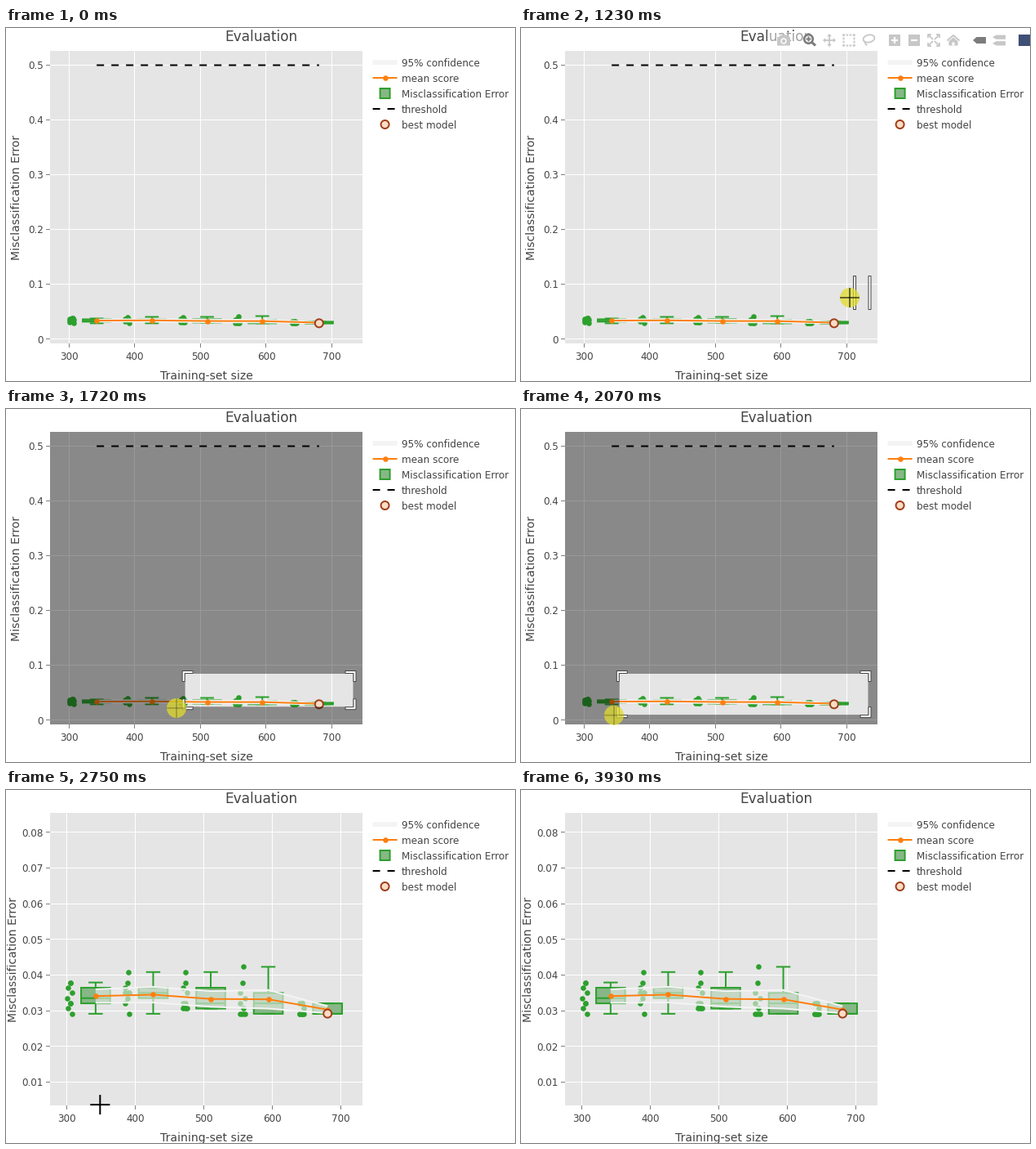
These frames come from a looping animation (624 by 432 pixels, 4000 ms). A matplotlib script:

```python
import numpy as np
import matplotlib.pyplot as plt
from matplotlib.animation import FuncAnimation
from matplotlib.patches import Circle, Ellipse, PathPatch, Polygon, Rectangle
from matplotlib.path import Path

W, H, DPI = 624, 432, 96
PX = 72 / DPI                       # points per pixel
FRAMES, STEP = 200, 20
L, T, R, B = 54, 28, 437, 386       # plot area
START = (425.5, 324)                # where the drag begins

TEXT, GREEN, ORANGE = "#444444", "#2ca02c", "#ff7f0e"
PEACH, RUST, BOX = "#fbdcc6", "#a0401c", "#87b787"
ICON, ACTIVE = "#c7c7c7", "#7c7c7c"

plt.rcParams["font.family"] = "DejaVu Sans"
fig = plt.figure(figsize=(W / DPI, H / DPI), dpi=DPI, facecolor="white")
ax = fig.add_axes([0, 0, 1, 1])
ax.set_xlim(0, W)
ax.set_ylim(H, 0)
ax.axis("off")
area = Rectangle((L, T), R - L, B - T, fc="#e5e5e5", ec="none", zorder=0)
ax.add_patch(area)


def line(xs, ys, color, width=2, z=3, **kw):
    return ax.plot(xs, ys, color=color, lw=width * PX, zorder=z, snap=False,
                   solid_capstyle="butt", dash_capstyle="butt", **kw)[0]


def dashed(xs, ys):
    return line(xs, ys, "black", z=2.9, dashes=(4.5, 4.5))


def dots(xs, ys, color, size=6.6, z=3):
    return ax.plot(xs, ys, "o", color=color, ms=size * PX, mec="none",
                   zorder=z, snap=False)[0]


def best(x, y):
    return patch(Circle((x, y), 5, fc=PEACH, ec=RUST, lw=2 * PX), 3)


def label(x, y, s, size=12, ha="left", **kw):
    return ax.text(x, y, s, fontsize=size * PX, color=TEXT, ha=ha,
                   va="baseline", zorder=6, **kw)


def patch(p, z):
    p.set_zorder(z)
    p.set_snap(False)
    return ax.add_patch(p)


def polys(*shapes):
    verts, codes = [], []
    for s in shapes:
        verts += list(s) + [s[0]]
        codes += [Path.MOVETO] + [Path.LINETO] * (len(s) - 1) + [Path.CLOSEPOLY]
    return Path(verts, codes)


def rect(l, t, r, b):
    return [(l, t), (r, t), (r, b), (l, b)]


def crisp(v):
    """Middle of the pixel row or column a hairline falls in."""
    return np.floor(v - .3) + .5


# ---- data -----------------------------------------------------------------
UNIT = 684                          # errors are whole counts out of this
SIZES = np.array([342, 426, 510, 594, 680.5])
MEAN = np.array([.0342, .0346, .0334, .0333, .0304])
SPREAD = np.array([.0019, .0022, .0022, .0026, .0010])
# lowest, first quartile, median, third quartile, highest
BOXES = [(20, 22, 23, 25, 26), (20, 23, 24, 25, 28), (21, 21, 22, 25, 28),
         (20, 20, 22, 24, 29), (20, 20, 20, 22, 22)]
RANK = np.arange(9)
JITTER = -38 + 3.5 * np.cos(2.5 * RANK)


def view(x300, sx, y0, sy, yticks, fmt, title_x):
    """Draw the chart for one axis range and return its artists."""
    X = lambda v: x300 + (np.asarray(v) - 300) * sx
    Y = lambda v: y0 - np.asarray(v) * sy
    N = lambda n: Y(np.asarray(n) / UNIT)
    out, marks = [], []

    for v in range(300, 701, 100):
        x = crisp(X(v))
        out += [line([x, x], [T, B], "white", 1, 1),
                line([x, x], [B, B + 5], "#7f7f7f", 1, 1),
                label(X(v), 406, str(v), ha="center")]
    for v in yticks:
        y = crisp(Y(v))
        out += [line([L, R], [y, y], "white", 1, 1),
                line([L - 5, L], [y, y], "#7f7f7f", 1, 1),
                label(46, Y(v) + 4.5, fmt % v, ha="right")]
    out.append(label(title_x, 207, "Misclassification Error", 14, "center",
                     rotation=90, rotation_mode="anchor"))

    for c, summary in zip(SIZES, BOXES):
        l, m, r = X([c - 21.2, c, c + 21.2])
        cap = X([c - 10.4, c + 10.4])
        lo, q1, med, q3, hi = N(summary)
        marks.append(patch(Rectangle((l, q3), r - l, q1 - q3, fc=BOX,
                                     ec=GREEN, lw=2 * PX), 2))
        marks.append(line([l, r], [med, med], GREEN, z=2.1))
        for a, b in ((q3, hi), (q1, lo)):
            marks.append(line([m, m], [a, b], GREEN, z=2.1))
            marks.append(line(cap, [b, b], GREEN, z=2.1))
        counts = np.round(np.interp(RANK, RANK[::2], summary))
        marks.append(dots(X(c + JITTER), N(counts), GREEN, z=2.2))

    xs, mid = X(SIZES), Y(MEAN)
    up, low = Y(MEAN + SPREAD), Y(MEAN - SPREAD)
    ring = list(zip(xs, up)) + list(zip(xs[::-1], low[::-1]))
    marks.append(patch(Polygon(ring, fc="#ededed", ec="none", alpha=.6), 2.5))
    for edge in (up, low):
        marks.append(line(xs, edge, "#f4f4f4", z=2.6))
    marks += [line(xs, mid, ORANGE, z=2.8), dots(xs, mid, ORANGE, z=2.8),
              dashed(xs[[0, -1]], Y([.5, .5])), best(xs[-1], Y(.0293))]
    for a in marks:
        a.set_clip_path(area)
    return out + marks


wide = view(77.35, .8055, 381, 671, np.arange(6) / 10, "%g", 17)
close = view(74.6, .84, 401.6, 4368, np.arange(1, 9) / 100, "%.2f", 13.5)

# ---- titles and legend ----------------------------------------------------
label(313, 16, "Evaluation", 17, "center")
label(245.7, 430, "Training-set size", 14, "center")
rows = 42 + 19 * np.arange(5)
for y, s in zip(rows, ("95% confidence", "mean score", "Misclassification Error",
                       "threshold", "best model")):
    label(484.7, y + 4.7, s)
key = np.array([449.6, 479.6])
mid_key = key.mean()
line(key, rows[[0, 0]], "#f4f4f4", 6)
line(key, rows[[1, 1]], ORANGE)
dots([mid_key], [rows[1]], ORANGE)
patch(Rectangle((mid_key - 6, rows[2] - 6), 12, 12, fc=BOX, ec=GREEN, lw=2 * PX), 3)
dashed(key, rows[[3, 3]])
best(mid_key, rows[4])

# ---- toolbar --------------------------------------------------------------
bar = []                            # (artist, full opacity)
SIGNS = (-1, 1)
MID = 15                            # middle height of the icons


def tool(artist, alpha=1):
    bar.append((artist, alpha))


def shape(pts, color=ICON):
    tool(patch(Polygon(pts, fc=color, ec="none"), 7))


def stroke(xs, ys, color=ICON, width=2):
    tool(line(xs, ys, color, width, 7))


def disc(x, y, r, color=ICON):
    tool(patch(Circle((x, y), r, fc=color, ec="none"), 7))


def plus(x, y, r, color, width=2):
    stroke([x - r, x + r], [y, y], color, width)
    stroke([x, x], [y - r, y + r], color, width)


def tag(x, y, h, color):
    shape([(x, y), (x + 4.5, y - h), (x + 16, y - h), (x + 16, y + h),
           (x + 4.5, y + h)], color)


tool(patch(Rectangle((302, 5), 322, 18, fc="white", ec="none"), 6.5), .5)
# camera
shape(rect(314, 11, 330, 21.5))
shape(rect(318, 8.5, 326, 11))
disc(322, 16, 3.7, "white")
disc(322, 16, 2.2)
# magnifier
stroke([356.5, 361], [17.5, 21.5], ACTIVE, 3)
disc(352.5, 13.5, 6.6, ACTIVE)
disc(352.5, 13.5, 4, "white")
plus(352.5, 13.5, 3, ACTIVE)
# pan
plus(378, MID, 6, ICON, 1.8)
for a in np.arange(4) * np.pi / 2:
    ux, uy = np.cos(a), np.sin(a)
    cx, cy = 378 + 4.8 * ux, MID + 4.8 * uy
    shape([(378 + 8 * ux, MID + 8 * uy), (cx + 3 * uy, cy - 3 * ux),
           (cx - 3 * uy, cy + 3 * ux)])
# box select
for k in 4.1 * np.arange(4) - 7.5:
    for s in SIGNS:
        stroke([402 + k, 404.6 + k], [MID + 6.5 * s] * 2)
        stroke([402 + 6.5 * s] * 2, [MID + k, MID + k + 2.6])
# lasso
tool(patch(Ellipse((426.5, 13), 14, 9, angle=-12, fill=False, ec=ICON,
                   lw=1.8 * PX), 7))
stroke([421, 422, 424], [16, 18.5, 21.5], width=1.8)
# zoom in and out
for x in (458, 482):
    shape(rect(x - 7, MID - 7, x + 7, MID + 7))
plus(458, MID, 4, "white", 2.2)
stroke([478, 486], [MID, MID], "white", 2.2)
# autoscale
for ux in SIGNS:
    for uy in SIGNS:
        stroke([506 + ux * d for d in (3, 7, 7)],
               [MID + uy * d for d in (7, 7, 3)], width=1.8)
        stroke([506 + ux, 506 + ux * 6], [MID + uy, MID + uy * 6], width=1.8)
# home
stroke([522.5, 530, 537.5], [15.5, 9, 15.5])
shape([(530, 11.5), (535.5, 16.2), (535.5, 21.5), (524.5, 21.5), (524.5, 16.2)])
shape(rect(528.5, 17.5, 531.5, 21.5), "white")
# hover tags
tag(554, MID, 4, ACTIVE)
for s in SIGNS:
    tag(578, MID + 3.8 * s, 2.6, ICON)
shape(rect(610, 8, 624, 22), "#3f4f75")

# ---- selection and pointer ------------------------------------------------
shade = patch(PathPatch(polys(rect(L, T, R, B)), fc="black", ec="none"), 4)
grips = patch(PathPatch(polys(rect(L, T, R, B)), fc="white", ec=TEXT, lw=PX), 5)
glow = patch(Circle(START, 12, fc="#e1dc2d", ec="none"), 8)
cross = [line([0, 0], [0, 0], "black", 2, 9) for _ in range(2)]
ARROW = np.array([(0, 0), (0, 16), (3.8, 12.6), (6.4, 18.5), (8.8, 17.5),
                  (6.3, 11.6), (11.4, 11.6)])
half = np.array([(-9, 0), (-5, -4), (-5, -1), (5, -1), (5, -4)])
RESIZE = np.vstack([half, -half])
arrow = patch(Polygon(ARROW, fc="white", ec="black", lw=PX), 9)

# time, x, y of the pointer's turning points
PATH = np.array([
    (120, 526, 405), (610, 429, 329), (750, *START), (1160, *START),
    (1370, 358, 342), (1720, 209, 366), (2280, 57, 380), (2680, 57, 380),
    (3310, 582, 426), (3450, 592, 431)]).T


def pointer(t):
    t0, t1 = PATH[0, :2]
    if t0 < t < t1:                 # slows down on the way in
        t = t1 - (t1 - t) ** 2 / (t1 - t0)
    return np.interp(t, PATH[0], PATH[1]), np.interp(t, PATH[0], PATH[2])


def held(t):
    """The picture moves in 70 ms steps counted from a few starts."""
    base = max(b for b in (0, 120, 1230, 2680, 3720) if b <= t)
    return base + (t - base) // 70 * 70 if base else 0


def select(q):
    on = 1230 <= q < 2750
    shade.set_visible(on)
    grips.set_visible(on)
    if not on:
        return
    l, b = pointer(q - 25 if q < 2280 else 2280)
    r, t = START
    b = min(b, 379)
    if b - t < 20:                  # a flat drag selects the full height
        hole = rect(l, T, r, B)
        marks = [rect(l - 3.5, t - 20.5, l - .5, t + 20.5),
                 rect(r + .5, t - 20.5, r + 3.5, t + 20.5)]
    else:
        hole = rect(l, t, r, b)
        bracket = np.array([(-3.5, 9.5), (-.5, 9.5), (-.5, -.5), (9.5, -.5),
                            (9.5, -3.5), (-3.5, -3.5)])
        marks = [bracket * (ux, uy) + (cx, cy)
                 for cx, ux in ((l, 1), (r, -1)) for cy, uy in ((t, 1), (b, -1))]
    shade.set_path(polys(rect(L, T, R, B), hole[::-1]))
    shade.set_alpha(float(np.interp(q, [1270, 1470], [0, .4])))
    grips.set_path(polys(*marks))


def draw(i):
    q = held(i * STEP + STEP // 2)
    zoomed = q >= 2750
    for a in wide:
        a.set_visible(not zoomed)
    for a in close:
        a.set_visible(zoomed)

    fade = float(np.interp(q, [120, 420, 1230, 1480, 2750, 3050, 3620, 3930],
                           [0, 1, 1, 0, 0, 1, 1, 0]))
    for a, full in bar:
        a.set_alpha(full * fade)
        a.set_visible(fade > 0)

    select(q)
    x, y = pointer(q)
    shown = 120 <= q < 3520
    inside = L <= x <= R and T <= y <= B
    on_axis = L <= x <= R and B < y < B + 20
    pressed = 820 <= q < 2680
    glow.center = x, y
    glow.set_visible(pressed)
    glow.set_alpha(.4 if q < 890 else .75)
    cross[0].set_data([x - 12, x + 12], [y, y])
    cross[1].set_data([x, x], [y - 12, y + 12])
    for c in cross:
        c.set_visible(shown and inside)
        c.set_alpha((.55 if q < 1500 else .2) if pressed else 1)
    arrow.set_xy((RESIZE if on_axis else ARROW) + (x, y))
    arrow.set_visible(shown and not inside)
    return []


anim = FuncAnimation(fig, draw, frames=FRAMES, interval=STEP, repeat=True,
                     init_func=lambda: draw(0), cache_frame_data=False)
plt.show()
```
